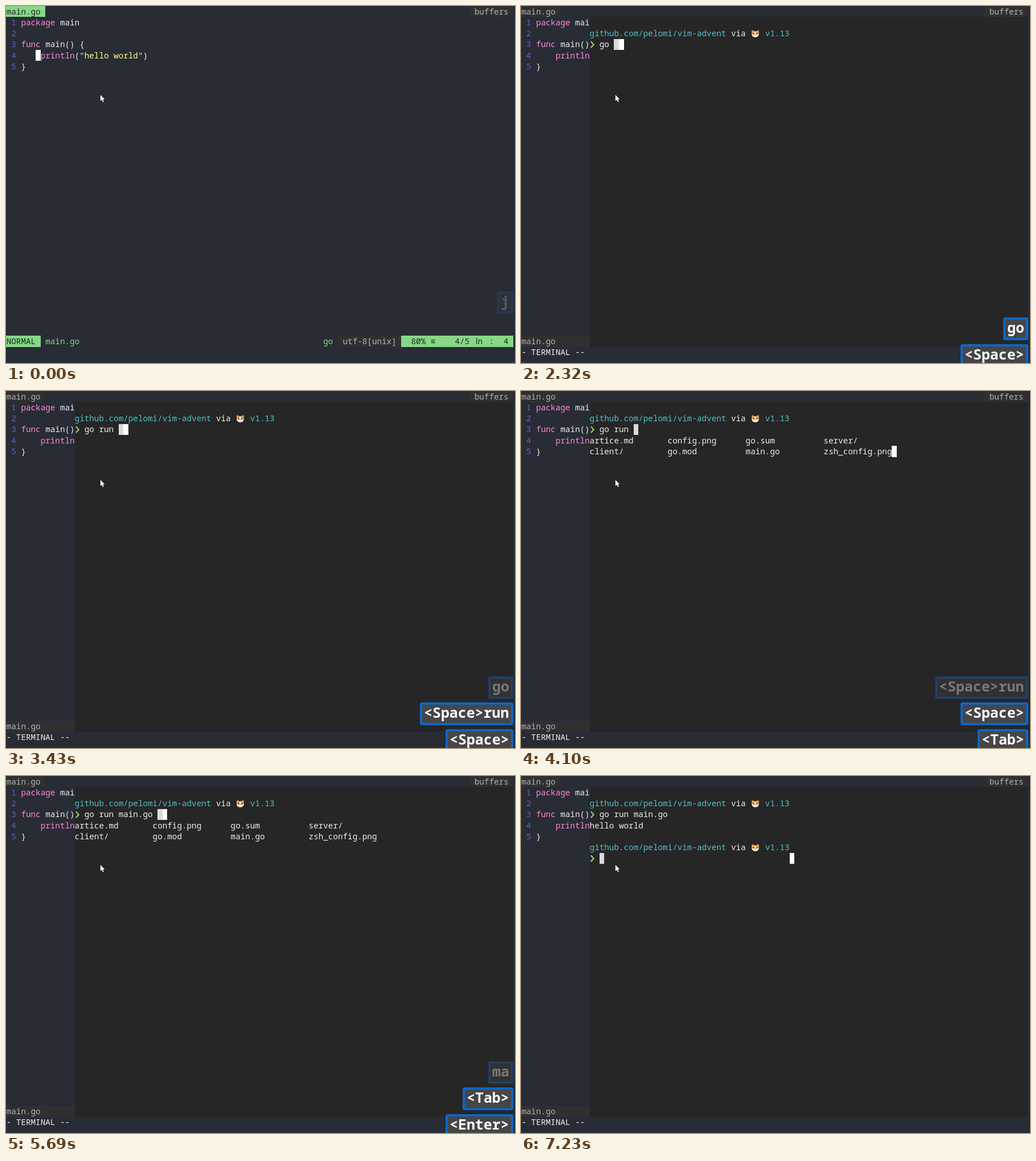
Animation of 894 by 626 pixels, one loop 8000 ms. Source, as an HTML page with a canvas:

```html
<!DOCTYPE html>
<html lang="en">
<head>
<meta charset="utf-8">
<title>Floating terminal</title>
<style>
html, body { margin: 0; width: 100%; height: 100%; overflow: hidden; background: #282c34; }
canvas { display: block; }
</style>
</head>
<body>
<canvas id="stage" width="894" height="626"></canvas>
<script>
const ctx = document.getElementById('stage').getContext('2d');
const LOOP = 8000, CW = 8.5625, RH = 19.28, LEFT = 0.7;
const MONO = '"Noto Sans Mono", "DejaVu Sans Mono", monospace';
const BG = '#282c34', TERM = '#262626', BAR = '#303030', GREEN = '#87d787', DARK = '#262626',
  GREY = '#b2b2b2', FG = '#eeeeee', PINK = '#ff87d7', YELLOW = '#ffff87', NUM = '#6560bd', CYAN = '#52bfcb';

const TICKS = [0, 590, 780, 930, 1080, 1200, 2050, 2190, 2320, 2450, 2570, 2700, 2880, 3310, 3430,
  3560, 3710, 3980, 4100, 4250, 4380, 4530, 4680, 4830, 4950, 5100, 5550, 5690, 5820, 5930, 6080,
  6210, 6960, 7100, 7230];

// Key captions: parts, the time of each part, start of fading
const KEYS = [
  { parts: ['\\', 'd', 'f'], at: [590, 780, 930], fade: 2050 },
  { parts: ['g', 'o'], at: [2050, 2190], fade: 3310 },
  { parts: ['<Space>', 'r', 'u', 'n'], at: [2320, 2450, 2570, 2700], fade: 3980 },
  { parts: ['<Space>'], at: [3310], fade: 4530 },
  { parts: ['<Tab>'], at: [3560], fade: 4830 },
  { parts: ['m', 'a'], at: [4250, 4380], fade: 5550 },
  { parts: ['<Tab>'], at: [4680], fade: 5930 },
  { parts: ['<Enter>'], at: [5690], fade: 6960 }
];
const COMMAND = 'go run main.go ';
// [time, characters echoed]
const ECHO = [[0, 0], [2190, 1], [2320, 3], [2570, 4], [2700, 5], [2880, 6], [3430, 7],
  [4250, 8], [4380, 9], [4680, 15]];
const FILES = [['artice.md', 'config.png', 'go.sum', 'server/'],
  ['client/', 'go.mod', 'main.go', 'zsh_config.png']];

function rect(x0, y0, x1, y1, color) {
  ctx.fillStyle = color;
  ctx.fillRect(x0, y0, x1 - x0, y1 - y0);
}

// Left edge of a column; the first one reaches the window edge
const colX = col => col ? Math.round(col * CW + LEFT) : 0;

function cells(col, row, n, color, rows = 1) {
  rect(colX(col), Math.round(row * RH), colX(col + n), Math.round((row + rows) * RH), color);
}

function text(col, row, str, color) {
  ctx.font = '14.27px ' + MONO;
  ctx.fillStyle = color;
  [...str].forEach((c, i) => ctx.fillText(c, (col + i) * CW + LEFT, Math.round(row * RH + 14.6)));
}

function editor() {
  for (let i = 1; i < 6; i++) text(1, i, String(i), NUM);
  text(3, 1, 'package', PINK);
  text(11, 1, 'main', FG);
  text(3, 3, 'func', PINK);
  text(8, 3, 'main() {', FG);
  text(7, 4, 'println', PINK);
  text(14, 4, '(', FG);
  text(15, 4, '"hello world"', YELLOW);
  text(28, 4, ')', FG);
  text(3, 5, '}', FG);
  cells(95, 0, 9, BAR);
  text(96, 0, 'buffers', GREY);
}

function normalBars() {
  cells(6, 4, 1, '#fff');
  cells(0, 0, 8, GREEN);
  text(0, 0, 'main.go', DARK);
  cells(0, 30, 7, GREEN);
  text(0, 30, 'NORMAL', DARK);
  text(8, 30, 'main.go', GREEN);
  text(65, 30, 'go', GREEN);
  cells(68, 30, 13, BAR);
  text(69, 30, 'utf-8[unix]', GREY);
  cells(81, 30, 23, GREEN);
  text(83, 30, '80% ≡    4/5', DARK);
  text(99, 30, ':  4', DARK);
  ctx.font = '14px "Noto Sans", sans-serif';
  ctx.fillText('ln', 825, 593);
}

function dot(x, y, rx, ry, color) {
  ctx.fillStyle = color;
  ctx.beginPath();
  ctx.ellipse(x, y, rx, ry, 0, 0, 7);
  ctx.fill();
}

function hamster(x, y) {
  dot(x, y + 1, 6.3, 5.2, '#fff3e2');
  for (const s of [-1, 1]) {
    dot(x + s * 4.6, y - 4, 2, 2.2, '#c9803a');
    dot(x + s * 3.6, y - 1.6, 2.6, 3, '#f0a648');
    dot(x + s * 2.9, y, 1.1, 1.3, '#33251e');
  }
  dot(x, y + 2, 1.2, 0.9, '#c85a6a');
}

function prompt(row) {
  text(14, row, 'github.com/pelomi/vim-advent', CYAN);
  text(43, row, 'via', FG);
  hamster(411.5, row * RH + 10);
  text(50, row, 'v1.13', CYAN);
  const y = (row + 1) * RH + 9.8;
  ctx.strokeStyle = '#a3d06c';
  ctx.lineWidth = 2.2;
  ctx.beginPath();
  ctx.moveTo(122.8, y - 5.5);
  ctx.lineTo(127.6, y);
  ctx.lineTo(122.8, y + 5.5);
  ctx.stroke();
}

function cursors(col, row, col2 = col + 1, row2 = row) {
  cells(col, row, 1, '#dadada');
  cells(col2, row2, 1, '#fff');
}

function terminal(t) {
  cells(0, 0, 8, BAR);
  text(0, 0, 'main.go', GREY);
  cells(0, 30, 14, BAR);
  text(0, 30, 'main.go', GREY);
  text(0, 31, '- TERMINAL --', FG);
  cells(14, 1, 90, TERM, 30);
  if (t < 1200) return cursors(14, 1);

  prompt(2);
  const typed = ECHO.filter(e => e[0] <= t).pop()[1];
  text(16, 3, COMMAND.slice(0, typed), FG);
  const listed = t >= 3710 && t < 5820;
  if (listed) FILES.forEach((names, r) => names.forEach((n, c) => text(14 + 16 * c, 4 + r, n, FG)));

  if (t < 5820) {
    if (!typed) cursors(16, 3, 55);
    else if (listed && t < 4250) cursors(16 + typed, 3, 76, 5);
    else cursors(16 + typed, 3);
    return;
  }
  if (t >= 6080) text(14, 4, 'hello world', FG);
  if (t >= 6210) {
    prompt(6);
    cursors(16, 7, 55);
  } else cursors(14, t < 6080 ? 4 : 5);
}

function caption(str, slot, alpha) {
  const w = str.length * 15 + 14, x = 891 - w, y = Math.round(592.6 - 46.4 * slot);
  ctx.globalAlpha = alpha;
  ctx.fillStyle = '#464646';
  ctx.strokeStyle = '#0d66c8';
  ctx.lineWidth = 4;
  ctx.beginPath();
  ctx.roundRect(x + 2, y + 2, w - 4, 36, 1.5);
  ctx.fill();
  ctx.stroke();
  ctx.fillStyle = '#fff';
  ctx.font = 'bold 24.8px ' + MONO;
  [...str].forEach((c, i) => ctx.fillText(c, x + 7 + i * 14.95, y + 27));
  ctx.globalAlpha = 1;
}

function captions(t, tick) {
  if (t < 2320) caption('j', 2, 0.2);
  const shown = KEYS.filter(k => k.at[0] <= t);
  shown.forEach((k, i) => {
    const age = tick - TICKS.indexOf(k.fade);
    const alpha = age < 0 ? 1 : [0.6, 0.35][age] || 0;
    const str = k.parts.filter((p, j) => k.at[j] <= t).join('');
    if (alpha) caption(str, shown.length - 1 - i, alpha);
  });
}

function pointer() {
  const arrow = new Path2D('M165.8 155.8v11l2.5-2.3 1.8 4 1.8-.8-1.8-3.9h3.4z');
  ctx.fillStyle = '#fff';
  ctx.strokeStyle = '#111';
  ctx.lineWidth = 1.2;
  ctx.stroke(arrow);
  ctx.fill(arrow);
}

function draw(now) {
  const time = now % LOOP;
  const tick = TICKS.filter(v => v <= time).length - 1, t = TICKS[tick];
  rect(0, 0, 894, 626, BG);
  editor();
  if (t < 1080) normalBars();
  else terminal(t);
  captions(t, tick);
  pointer();
}

const start = performance.now();
function loop() {
  draw(Math.max(0, performance.now() - start));
  requestAnimationFrame(loop);
}
loop();
</script>
</body>
</html>
```
